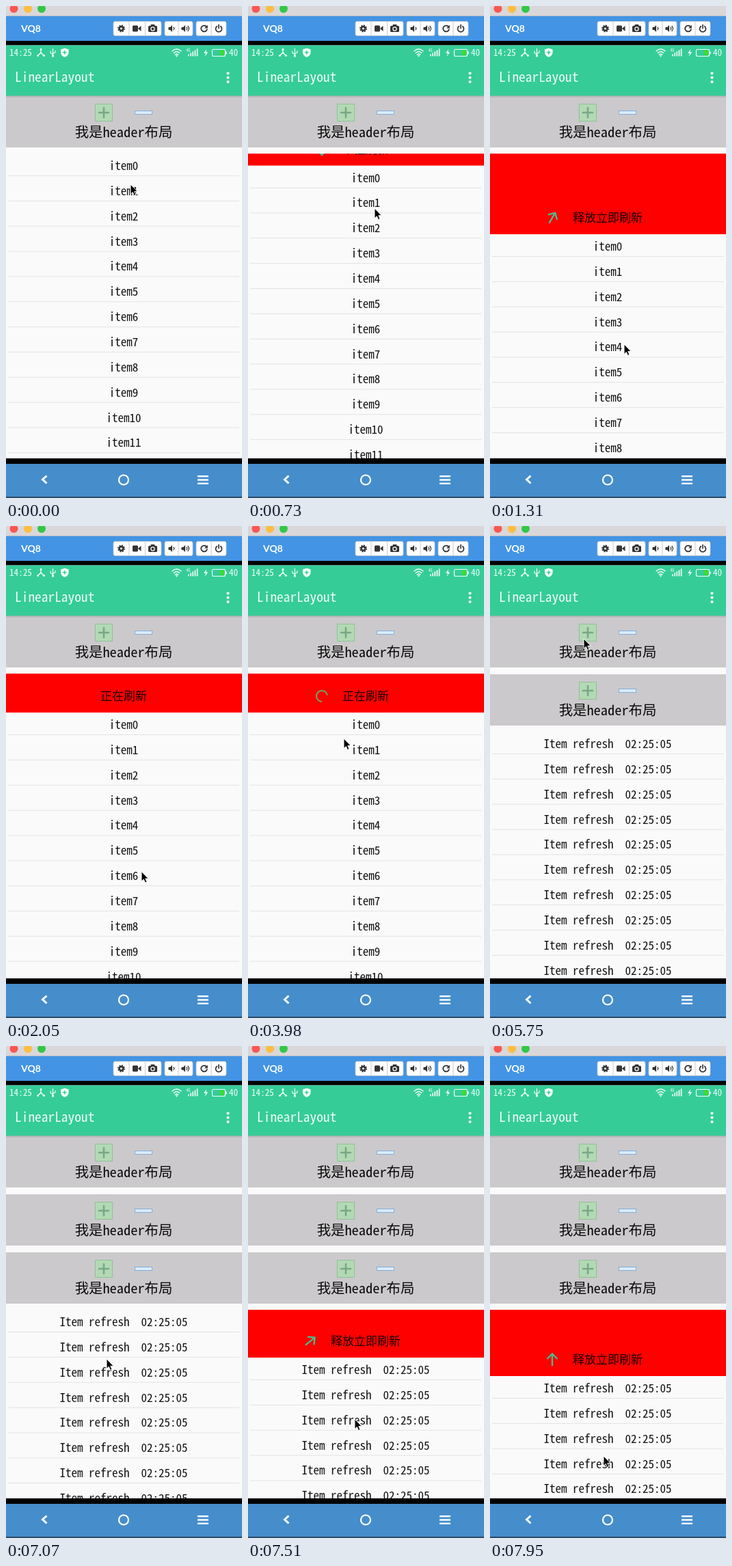
These frames come from a looping animation (345 by 720 pixels, 8 s). An HTML page:

```html
<!DOCTYPE html>
<html lang="zh">
<head>
<meta charset="utf-8">
<style>
  html, body { margin: 0; height: 100%; overflow: hidden; background: #fafafa; }
  svg { display: block; }
  text { font-family: "Noto Sans Mono CJK SC", "Noto Sans CJK SC", "Noto Sans CJK", "Liberation Mono", monospace; white-space: pre; }
  .mid { text-anchor: middle; }
  .line { fill: none; stroke-linecap: round; stroke-linejoin: round; }
</style>
</head>
<body>
<svg id="stage" width="345" height="720" viewBox="0 0 345 720"></svg>
<script>
const LOOP = 8000, STEP = 147.3, ROW = 36.85, HEADER = 85;

const rect = (x, y, w, h, fill, more = '') =>
  `<rect x="${x}" y="${y}" width="${w}" height="${h}" fill="${fill}" ${more}/>`;
const dot = (x, y, r, fill) => `<circle cx="${x}" cy="${y}" r="${r}" fill="${fill}"/>`;
const line = (d, color, width, more = '') =>
  `<path class="line" d="${d}" stroke="${color}" stroke-width="${width}" ${more}/>`;
const shape = (d, fill) => `<path d="${d}" fill="${fill}"/>`;
const text = (x, y, size, fill, s, more = '') =>
  `<text x="${x}" y="${y}" font-size="${size}" fill="${fill}" ${more}>${s}</text>`;

const buttonGroup = (x, w, splits) =>
  rect(x, 22.5, w, 21, '#fdfdfd', 'rx="2.5" stroke="#b9c4d0" stroke-width=".8"') +
  splits.map(s => rect(s, 23, 1, 20, '#c9ced4')).join('');

function desktopBar() {
  const ink = '#333';
  const speaker = x => shape(`M${x} 31h2.5l3-3v10l-3-3h-2.5z`, ink);
  return rect(0, 0, 345, 15, '#d9d7d9') + rect(0, 14, 345, 1, '#b9bcc2') +
    dot(11.5, 4, 6, '#fc5652') + dot(32, 4, 6, '#fdbd3e') + dot(52, 4, 6, '#33c748') +
    rect(0, 15, 345, 36, '#4394e4') +
    `<text x="22" y="38" font-size="14" font-weight="700" fill="#fff" style="font-family:Lato,sans-serif">VQ8</text>` +
    buttonGroup(157, 70, [179.5, 203]) + buttonGroup(232, 41, [251.5]) + buttonGroup(278, 44, [299.5]) +
    `<circle cx="168.5" cy="33" r="2.9" fill="none" stroke="${ink}" stroke-width="2.6"/>` +
    `<circle cx="168.5" cy="33" r="4.7" fill="none" stroke="${ink}" stroke-width="1.6" stroke-dasharray="1.9 1.79"/>` +
    rect(185, 28.5, 8, 9, ink, 'rx="1.5"') + shape('M193 33l4.5-4v8z', ink) +
    rect(208, 29, 13, 9, ink, 'rx="1.5"') + rect(211.5, 27, 6, 4, ink, 'rx="1"') +
    `<circle cx="214.5" cy="33.5" r="2.6" fill="${ink}" stroke="#fff" stroke-width="1.2"/>` +
    speaker(237.5) + line('M245 31.2q1.6 1.8 0 3.6', ink, 1.2) +
    speaker(256.5) + line('M264 31.2q1.6 1.8 0 3.6M266 29.5q3 3.5 0 7', ink, 1.2) +
    line('M293.2 30.4A4.4 4.4 0 1 0 293.9 34.2', ink, 1.8) + shape('M294.8 27.8v4.7h-4.7z', ink) +
    line('M308.3 29.7A4.5 4.5 0 1 0 313.7 29.7M311 27.6v5', ink, 1.7) +
    rect(0, 51, 345, 6.5, '#000');
}

function phoneBar() {
  const w = '#f2fffa';
  const signal = [3, 5, 7, 9, 11].map((h, i) => rect(266 + i * 3.2, 73.5 - h, 1.7, h, w)).join('');
  return rect(0, 57.5, 345, 74.5, '#35cc98') +
    text(5, 72.5, 13.2, w, '14:25') +
    line('M51 63v5l-4.5 5M51 68l4.5 5', w, 1.4) + dot(51, 63.5, 1.5, w) + dot(46.5, 72.5, 1.5, w) + dot(55.5, 72.5, 1.5, w) +
    line('M68.5 62.5v11M65 66v2.5l3.5 2.5M72 65.5v2.5l-3.5 2', w, 1.2) + dot(68.5, 73, 1.7, w) +
    shape('M80 63.5l5.8-1.8 5.8 1.8v4.5q0 4.5-5.8 7-5.8-2.500-5.8-7z', w) + line('M85.800 65.800v4.400M83.600 68h4.400', '#35cc98', 1.4) +
    line('M243 66q6.5-6 13 0M245.2 68.700q4.300-4 8.600 0M247.300 71.300q2.200-2 4.400 0', w, 1.4) + dot(249.5, 73, 1.2, w) +
    signal + text(263.5, 67, 6, w, '4G') +
    shape('M293.500 63l-4.500 6h3l-1.500 5 4.800-6.500h-3z', w) +
    rect(301.5, 63.500, 19, 10, 'none', `rx="2" stroke="${w}" stroke-width="1.2"`) +
    rect(313, 65, 6, 7, '#3ade2b') + rect(321, 66.500, 1.7, 4, w) +
    text(326, 72.5, 13.2, w, '40') +
    text(13, 110.5, 19.4, w, 'LinearLayout') +
    [98.5, 104.8, 111].map(y => dot(324.5, y, 2.1, w)).join('');
}

const header = i => `<g class="header" transform="translate(0 ${132 + i * HEADER})">` +
  rect(0, 0, 345, 75, '#cbc9cb') +
  rect(130.5, 11.5, 25, 25, '#b3d9b4', 'stroke="#8fc197"') +
  line('M143 17v14M136 24h14', '#77a886', 2.6) +
  rect(188.5, 21.5, 25, 5, '#d9ecfa', 'stroke="#84aedb"') +
  text(172, 60, 20.4, '#0a0a0a', '我是header布局', 'class="mid"') + '</g>';

const row = i => text(172, 24 + i * ROW, 17, '#111', '', 'class="mid item"') +
  rect(3, 32 + i * ROW, 338, 1, '#e3e3e3');

const many = (n, f) => Array.from({ length: n }, (_, i) => f(i)).join('');

document.getElementById('stage').innerHTML =
  rect(0, 0, 345, 720, '#fafafa') +
  `<g id="list"><svg id="pull" width="345">${rect(0, 0, 345, 400, '#fe0000')}<g id="pullContent">
    ${text(172, 6, 17, '#150000', '', 'id="label" class="mid"')}
    <g id="arrow">${line('M0 -9V8.500M-7.500 1L0 8.500L7.500 1', '#47bd8e', 2.3, 'style="stroke-linecap:butt;stroke-linejoin:miter"')}</g>
    <circle id="spinner" r="8" fill="none" stroke="#6fa866" stroke-width="2" pathLength="100"/>
  </g></svg><g id="rows">${many(12, row)}</g></g>` +
  many(3, header) + desktopBar() + phoneBar() +
  rect(0, 131, 345, 1.5, '#8fb5a6') + rect(0, 132.5, 345, 1.5, '#bdbcbd') +
  rect(0, 662, 345, 8, '#000') + rect(0, 670, 345, 48, '#468dcc') + rect(0, 718, 345, 2, '#2b4a68') +
  line('M59.500 687.500L53.500 693l6 5.500', '#fff', 3, 'style="stroke-linecap:butt;stroke-linejoin:miter"') +
  '<circle cx="172" cy="693.500" r="7" fill="none" stroke="#fff" stroke-width="2.200"/>' +
  [687, 692.300, 697.600].map(y => rect(280, y, 16, 2.4, '#fff')).join('') +
  '<path id="cursor" d="M0 0V14.500L3.300 11.500L5.500 16.500L8 15.400L5.800 10.500H10.300Z" fill="#000" stroke="#fff" stroke-width="1"/>';

// Keys are [time, ...values]
const pullKeys = [[440, 0], [1030, 35], [1178, 62], [1325, 118], [1620, 123], [1767, 118], [1914, 82], [2062, 57],
  [4419, 57], [4566, 46], [4713, 20], [4860, 4], [5008, 1], [5155, 0], [7216, 0], [7512, 70], [7954, 97]];
const cursorKeys = [[440, 182, 261], [1030, 188, 331], [1178, 191, 385], [1325, 196, 495], [1620, 198, 506],
  [2600, 198, 505], [3530, 143, 322], [3977, 140, 311], [4419, 140, 311], [5008, 137, 176], [5300, 137, 165],
  [6340, 137, 165], [7070, 147, 458], [7216, 148, 407], [7512, 156, 546], [7954, 166, 600]];
const arrowKeys = [[1178, 0], [1325, -150], [1472, -180], [5100, -180], [5101, 0], [7365, 0], [7570, -180]];
const labels = [[0, '下拉刷新'], [1178, '释放立即刷新'], [1767, '正在刷新'], [4120, '刷新完成'], [5150, '下拉刷新'], [7500, '释放立即刷新']];

function at(keys, t) {
  const i = keys.findIndex(k => k[0] > t);
  if (i < 1) return keys.at(i).slice(1);
  const a = keys[i - 1], b = keys[i], p = (t - a[0]) / (b[0] - a[0]);
  return a.slice(1).map((v, n) => v + (b[n + 1] - v) * p);
}

const $ = id => document.getElementById(id);
const move = (id, x, y, turn = 0) => $(id).setAttribute('transform', `translate(${x} ${y}) rotate(${turn})`);
const show = (el, on) => el.setAttribute('visibility', on ? 'visible' : 'hidden');
const headers = document.querySelectorAll('.header'), items = document.querySelectorAll('.item');

function draw(ms) {
  const t = Math.floor((ms % LOOP + 16) / STEP) * STEP;
  const [pull] = at(pullKeys, t), [x, y] = at(cursorKeys, t);
  const count = t < 5590 ? 1 : t < 6180 ? 2 : 3;
  const label = labels.findLast(l => l[0] <= t)[1];
  const busy = label === '正在刷新', done = label === '刷新完成';
  const iconX = label.length > 4 ? 91 : 108;

  headers.forEach((h, i) => show(h, i < count));
  move('list', 0, 131 + count * HEADER);
  $('pull').setAttribute('height', pull);
  move('pullContent', 0, pull - 24);
  move('rows', 0, pull);
  items.forEach((el, i) => el.textContent = t < 4120 ? 'item' + i : 'Item refresh  02:25:05');

  $('label').textContent = label;
  move('arrow', iconX, 0, at(arrowKeys, t)[0]);
  show($('arrow'), !busy && !done);
  const sweep = 37.5 - 37.5 * Math.cos((t - 2062) / 1333 * 2 * Math.PI);
  $('spinner').setAttribute('stroke-dasharray', `${sweep} 100`);
  move('spinner', iconX, 0, 90 + (t - 3977) * 0.3);
  show($('spinner'), busy && t > 2070);
  move('cursor', x, y);
}

(function tick() {
  draw(performance.now());
  requestAnimationFrame(tick);
})();
</script>
</body>
</html>
```
